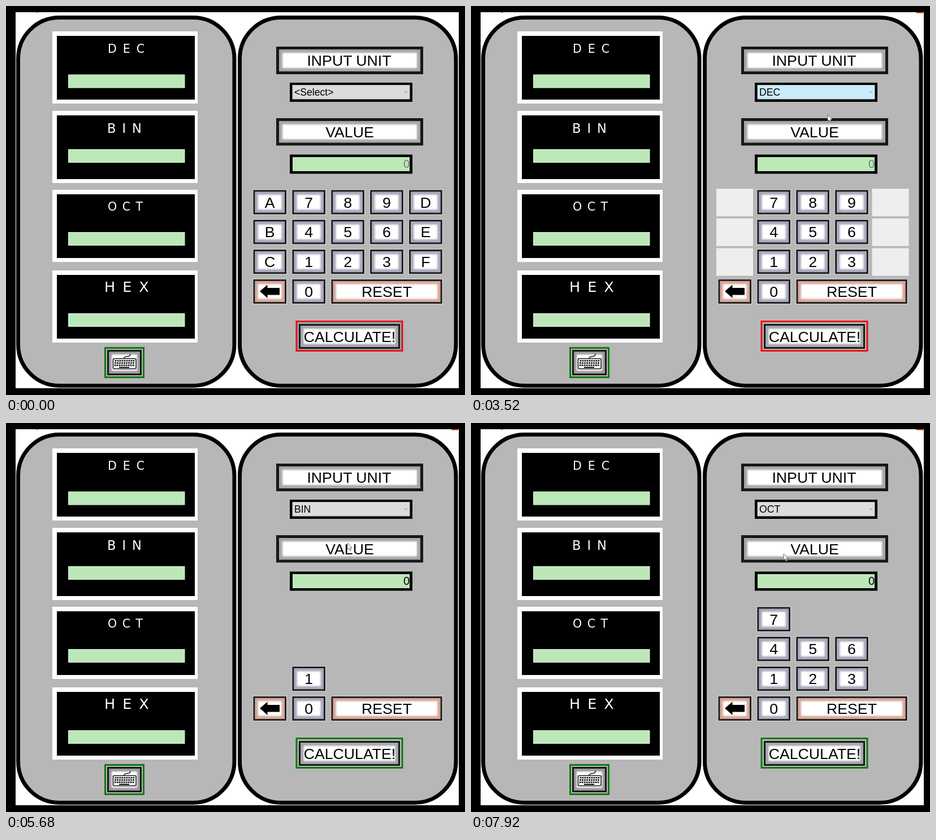
These frames come from a looping animation (812 px wide and 690 px high, 8 s). An HTML page:

```html
<!DOCTYPE html>
<html lang="en">
<head>
<meta charset="utf-8">
<title>Base converter</title>
<style>
html, body { margin: 0; width: 100%; height: 100%; overflow: hidden; background: #000; }
svg { display: block; width: 812px; height: 690px; }
text { font-family: "Liberation Sans", Arial, sans-serif; fill: #000; }
.btn { font-size: 26.67px; text-anchor: middle; }
.menu { font-size: 17.6px; }
.num { font-size: 20px; text-anchor: end; }
.title { font-family: "DejaVu Sans", sans-serif; fill: #fff; }
.soft { filter: blur(1.8px); }
</style>
</head>
<body>
<svg id="stage" viewBox="0 0 812 690" xmlns="http://www.w3.org/2000/svg"></svg>
<script>
const LOOP = 8000;
const GREEN = '#bce8b8', BLUE = '#1b69b3';
const MODES = ['<Select>', 'DEC', 'BIN', 'OCT', 'HEX'];
const BASES = [16, 10, 2, 8, 16];
const ROWS = ['A789D', 'B456E', 'C123F', '<0'];
const LIST = { x: 507, y: 166.5, w: 207, row: 20.2 };

const esc = s => s.replace(/</g, '&lt;').replace(/>/g, '&gt;');
const rect = (x, y, w, h, fill, more = '') =>
  `<rect x="${x}" y="${y}" width="${w}" height="${h}" fill="${fill}" ${more}/>`;
const text = (x, y, s, cls, more = '') =>
  `<text x="${x}" y="${y}" class="${cls}" ${more}>${esc(s)}</text>`;

// Dark frame, coloured bevel and a softly lit face.
function bevel(x, y, w, h, edge, tint, pad) {
  const e = edge + pad;
  return rect(x, y, w, h, '#16181a') +
    rect(x + edge, y + edge, w - 2 * edge, h - 2 * edge, tint) +
    rect(x + e, y + e, w - 2 * e, h - 2 * e, '#fff', 'class="soft"');
}

const panel = x => rect(x, 20.5, 382.5, 653, '#b7b7b7', 'rx="73" stroke="#000" stroke-width="7"');

function display(y, bar, name, x, base, size, gap) {
  return rect(82, y, 257, 128, '#fff') + rect(90, y + 8, 244, 113, '#000') +
    rect(110.5, bar + .5, 205.5, 23, GREEN, 'stroke="#d8f0d6"') +
    text(x, base, name, 'title', `font-size="${size}" letter-spacing="${gap}"`);
}

function key(label, x, y, w, tint) {
  const face = label === '<'
    ? '<path d="M449 506L462.5 494.5V500H484V512.5H462.5V518Z"/>'
    : text(x + w / 2, y + 31.5, label, 'btn');
  return rect(x - .5, y - .5, w + 1, 45, '#dcdcdc') +
    bevel(x + .5, y + .5, w - 1, 43, 2.8, tint, 5.5) + face;
}

function keypad() {
  let out = '';
  ROWS.forEach((row, r) => [...row].forEach((ch, c) => {
    const x = 437 + c * 68.9, y = 326 + r * 52.8;
    const tint = ch === '<' ? '#d6a595' : '#a9a7ba';
    out += `<g data-key="${esc(ch)}">${key(ch, x, y, 59.5, tint)}</g>`;
    if (ch !== '<') out += rect(x - 3, y - 2, 65, 49, '#eee', `data-tile="${ch}"`);
  }));
  return out + key('RESET', 575, 484.5, 197, '#d6a595');
}

function keyboardIcon() {
  let keys = '';
  for (let r = 0; r < 3; r++)
    for (let i = 0; i < 9; i++)
      keys += rect(192.5 + i * 4 - r * .4, 628 + r * 4, 2.8, 2.6, '#111');
  return rect(175.5, 606.5, 68, 52, 'none', 'stroke="#0b7a0b" stroke-width="3"') +
    bevel(179, 610, 61, 45, 3, '#999', 5) +
    rect(189.5, 625.5, 40.5, 18, '#fff', 'rx="2" stroke="#111" stroke-width="1.5"') + keys +
    rect(200, 640, 18, 2, '#111') +
    '<path d="M209 625C209 619 220 625 220 617" fill="none" stroke="#111" stroke-width="1.5"/>';
}

const field = y => rect(502, y, 217, 34, '#000');

const rows = MODES.map((m, i) => {
  const y = LIST.y + i * LIST.row;
  return rect(LIST.x, y, LIST.w, LIST.row, BLUE, 'data-row') +
    text(509, y + 16.3, m, 'menu', 'data-name');
}).join('');

const stage = document.getElementById('stage');
stage.innerHTML =
  '<defs><clipPath id="drop"><rect x="500" y="165" width="220" height="110"/></clipPath></defs>' +
  rect(0, 0, 812, 690, '#000') + rect(17, 11, 784, 667, '#fff') + rect(54, 11, 2, 1, '#444') +
  rect(788, 11, 12, 2, '#c4652f', 'id="mark"') +
  panel(21.5) + panel(413.5) +
  display(45, 121.5, 'DEC', 180, 83, 20.5, 11) +
  display(186, 254, 'BIN', 179, 224.5, 22.5, 11) +
  display(326, 401, 'OCT', 180, 362.5, 20.5, 9.5) +
  display(469, 545, 'HEX', 174, 506.5, 25.5, 13) +
  keyboardIcon() +
  bevel(478, 72, 260, 49, 5, '#a4a8a7', 6) + text(607, 106, 'INPUT UNIT', 'btn') +
  bevel(478, 199, 260, 48.5, 5, '#a4a8a7', 6) + text(608, 233, 'VALUE', 'btn') +
  field(136) + rect(507, 140.5, 207, 24.5, '#dcdcdc', 'id="box" stroke="#c4c8ca"') +
  text(510, 159, '', 'menu', 'id="chosen"') +
  '<path d="M705 151.5l2.5 2.5 2.5-2.5" fill="none" stroke="#666"/>' +
  field(263.5) + rect(507, 268, 207, 25, GREEN) + text(714, 287, '0', 'num', 'id="value"') +
  keypad() +
  rect(514, 559.5, 187, 52, 'none', 'id="ring" stroke-width="3"') +
  rect(516.5, 562.5, 182, 46.5, 'none', 'id="focus" stroke="#4a9ad4"') +
  bevel(518, 564, 179, 44, 3, '#a3a6a6', 5.5) + text(608, 595.5, 'CALCULATE!', 'btn') +
  '<g id="list" clip-path="url(#drop)"><g id="slide">' +
  rect(506.5, 165.5, 207.5, 102, GREEN, 'stroke="#3a78ae"') + rows + '</g></g>' +
  '<path id="mouse" d="M0 0V11.5L2.7 9 4.6 13.2 6.5 12.3 4.6 8.3H8.3Z" fill="#fff" stroke="#555" stroke-width=".9"/>';

const $ = id => document.getElementById(id);
const all = s => [...stage.querySelectorAll(s)];
const parts = {
  keys: all('[data-key]'), tiles: all('[data-tile]'),
  bars: all('[data-row]'), names: all('[data-name]')
};
const show = (el, on) => el.setAttribute('display', on ? 'inline' : 'none');

const PATH = [
  [1760, 786, 24], [1960, 665, 152], [2640, 665, 152], [3200, 631, 193], [4160, 631, 193],
  [4400, 616, 152], [4600, 616, 152], [5040, 604, 213], [6160, 604, 213],
  [6560, 578, 151], [6960, 578, 151], [7360, 553, 232], [8000, 553, 232]
];
const GLOW = [
  [0, 0], [1880, 0], [2080, 1], [3520, 1], [3840, 0], [4300, 0], [4520, .9], [5280, 1],
  [5520, 0], [6560, 0], [6800, .5], [7000, 1], [7560, 1], [7800, 0], [8000, 0]
];
// Each pick: menu opens, menu closes, chosen mode, end of the key flash.
const PICKS = [[2000, 3440, 1, 3600], [4480, 5200, 2, 5360], [6720, 7520, 3, 7520]];

function at(track, t) {
  if (t <= track[0][0]) return track[0].slice(1);
  const i = track.findIndex(k => k[0] > t);
  if (i < 0) return track[track.length - 1].slice(1);
  const a = track[i - 1], b = track[i];
  const u = (t - a[0]) / (b[0] - a[0]), e = u * u * (3 - 2 * u);
  return a.slice(1).map((v, n) => v + (b[n + 1] - v) * e);
}

const digit = ch => ch === '<' ? 0 : parseInt(ch, 16);

function draw(t) {
  const [x, y] = at(PATH, t), [glow] = at(GLOW, t);
  const done = PICKS.filter(p => t >= p[1]);
  const last = done[done.length - 1];
  const mode = last ? last[2] : 0, base = BASES[mode];
  const prev = done.length > 1 ? BASES[done[done.length - 2][2]] : 16;
  const flash = last && t < last[3];
  const menu = PICKS.find(p => t >= p[0] && t < p[1]);

  parts.keys.forEach(k => show(k, digit(k.dataset.key) < base));
  parts.tiles.forEach(k => {
    const d = digit(k.dataset.tile);
    show(k, flash && d >= base && d < prev);
  });

  const mix = (a, b) => Math.round(a + (b - a) * glow);
  $('box').setAttribute('fill', `rgb(${mix(220, 203)},${mix(220, 236)},${mix(220, 253)})`);
  $('chosen').textContent = MODES[mode];
  const ready = t >= 3600;
  $('value').style.fill = ready ? '#000' : '#6b7d69';
  $('ring').setAttribute('stroke', ready ? '#0b7a0b' : '#f00a0a');
  show($('focus'), t < 3440);
  show($('mark'), t >= 1840);

  show($('list'), !!menu);
  if (menu) {
    const open = Math.min(1, (t - menu[0]) / 170);
    $('slide').setAttribute('transform', `translate(0 ${-102.5 * (1 - open)})`);
    const over = Math.floor((y - LIST.y) / LIST.row);
    const lit = over >= 0 && over < 5 ? over : mode;
    parts.bars.forEach((b, i) => show(b, i === lit));
    parts.names.forEach((n, i) => n.style.fill = i === lit ? '#fff' : '#000');
  }

  show($('mouse'), t >= PATH[0][0]);
  $('mouse').setAttribute('transform', `translate(${x} ${y})`);
}

const start = performance.now();
function tick() {
  draw((performance.now() - start) % LOOP);
  requestAnimationFrame(tick);
}
tick();
</script>
</body>
</html>
```
